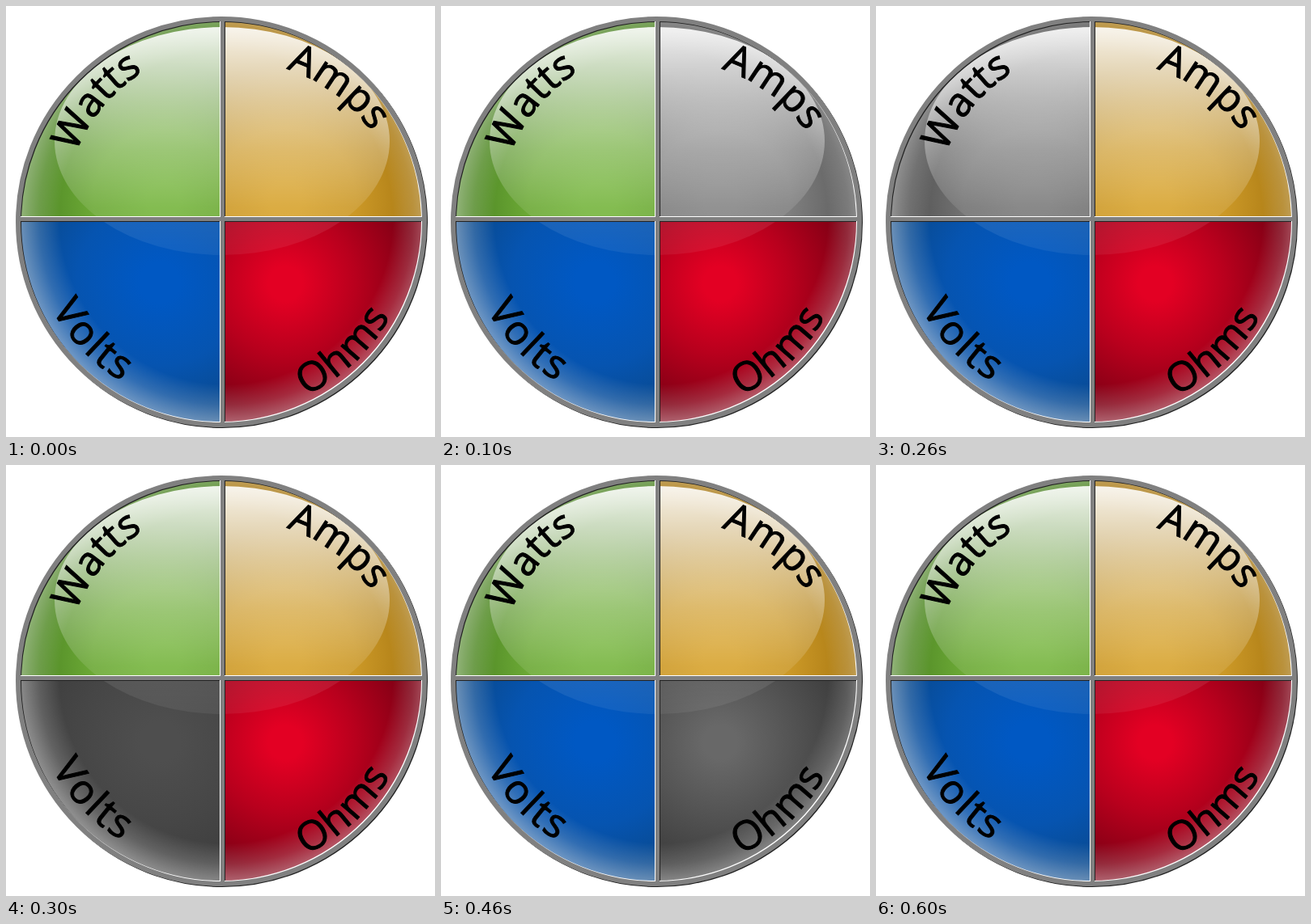
Animation, 530 px wide and 533 px high, one loop 700 ms. Source, as an HTML page:

```html
<!DOCTYPE html>
<html lang="en">
<head>
<meta charset="utf-8">
<title>Electrical units wheel</title>
<style>
  html, body { margin: 0; width: 100%; height: 100%; overflow: hidden; background: #fff; }
  svg { display: block; width: 530px; height: 533px; }
  text { font: 50px "Open Sans", "Noto Sans", sans-serif; text-anchor: middle; stroke: #000; stroke-width: 1; }
</style>
</head>
<body>
<svg id="stage" viewBox="0 0 530 533"></svg>
<script>
const CX = 266, CY = 267, STEP = 100;

// color and gray: gradient stops from the light's center outwards
const units = [
  { name: 'Watts', x: 0, y: 0, light: [195, 240], reach: 175,
    angle: -46.1, radius: 204, tilt: -4.5, spacing: 0,
    color: ['#76b53e', '#6ca936', '#4b8322'], gray: ['#7c7c7c', '#727272', '#4e4e4e'] },
  { name: 'Amps', x: 267.5, y: 0, light: [345, 240], reach: 175,
    angle: 41, radius: 211, tilt: -4.5, spacing: 0,
    color: ['#d7a32e', '#cb9827', '#a87812'], gray: ['#868686', '#7e7e7e', '#5c5c5c'] },
  { name: 'Volts', x: 0, y: 263.5, light: [190, 342], reach: 205,
    angle: 227.1, radius: 234, tilt: -1.5, spacing: 3,
    color: ['#0058c3', '#0654b0', '#0a4582'], gray: ['#4e4e4e', '#464646', '#3a3a3a'] },
  { name: 'Ohms', x: 267.5, y: 263.5, light: [345, 343], reach: 175,
    angle: 136.5, radius: 239, tilt: 0, spacing: 1.5,
    color: ['#e30023', '#b8001d', '#7d0014'], gray: ['#686868', '#545454', '#3c3c3c'] }
];

// index of the gray quadrant in each step, -1 for none
const sequence = [-1, 1, 0, 2, 3, 1, -1];

const stop = (offset, color, opacity = 1) =>
  `<stop offset="${offset}" stop-color="${color}" stop-opacity="${opacity}"/>`;

function shade(unit, mode) {
  const [x, y] = unit.light, [inner, middle, outer] = unit[mode];
  return `<radialGradient id="${unit.name}-${mode}" gradientUnits="userSpaceOnUse" cx="${x}" cy="${y}" r="${unit.reach}">
    ${stop(0.12, inner)}${stop(0.5, middle)}${stop(0.95, outer)}</radialGradient>`;
}

function point(radius, degrees) {
  const a = degrees * Math.PI / 180;
  return `${CX + radius * Math.sin(a)} ${CY - radius * Math.cos(a)}`;
}

function labelArc({ name, angle, radius, y }) {
  const turn = y ? -1 : 1;
  return `<path id="${name}-arc" d="M${point(radius, angle - 40 * turn)}
    A${radius} ${radius} 0 0 ${y ? 0 : 1} ${point(radius, angle + 40 * turn)}"/>`;
}

const quadrant = u =>
  `<rect id="${u.name}" x="${u.x}" y="${u.y}" width="267.5" height="${u.y ? 270 : 263.5}"/>`;

const label = u =>
  `<text letter-spacing="${u.spacing}" transform="rotate(${u.tilt} ${point(220, u.angle)})">
    <textPath href="#${u.name}-arc" startOffset="50%">${u.name}</textPath></text>`;

const frame = (color, shift) =>
  `<use href="#frame" stroke="${color}" transform="translate(${shift} ${shift})"/>`;

document.getElementById('stage').innerHTML = `
  <defs>
    ${units.map(u => shade(u, 'color') + shade(u, 'gray') + labelArc(u)).join('')}
    <radialGradient id="rim" gradientUnits="userSpaceOnUse" cx="272" cy="262" r="254">
      ${stop(0.81, '#fff', 0)}${stop(0.91, '#fff', 0.17)}${stop(1, '#fff', 0.4)}
    </radialGradient>
    <linearGradient id="gloss" x2="0" y2="1">
      ${stop(0, '#fff', 0.9)}${stop(0.2, '#fff', 0.69)}${stop(0.33, '#fff', 0.54)}
      ${stop(0.54, '#fff', 0.31)}${stop(0.79, '#fff', 0.1)}${stop(1, '#fff', 0.06)}
    </linearGradient>
    <clipPath id="disk"><circle cx="${CX}" cy="${CY}" r="250"/></clipPath>
    <g id="frame" fill="none">
      <circle cx="${CX}" cy="${CY}" r="251" stroke-width="6"/>
      <path d="M267.5 16V518M15 263.5H517" stroke-width="5"/>
    </g>
  </defs>
  <g clip-path="url(#disk)">
    ${units.map(quadrant).join('')}
    <circle cx="${CX}" cy="${CY}" r="250" fill="url(#rim)"/>
    <ellipse cx="267" cy="167" rx="207" ry="141" fill="url(#gloss)"/>
  </g>
  ${frame('#222', 1)}${frame('#fff', -1)}${frame('#808080', 0)}
  ${units.map(label).join('')}`;

const quadrants = units.map(u => document.getElementById(u.name));

function render(time) {
  const active = sequence[Math.floor(time / STEP) % sequence.length];
  units.forEach((u, i) =>
    quadrants[i].setAttribute('fill', `url(#${u.name}-${i === active ? 'gray' : 'color'})`));
}

const start = performance.now();
function tick() {
  render(performance.now() - start);
  requestAnimationFrame(tick);
}
tick();
</script>
</body>
</html>
```
